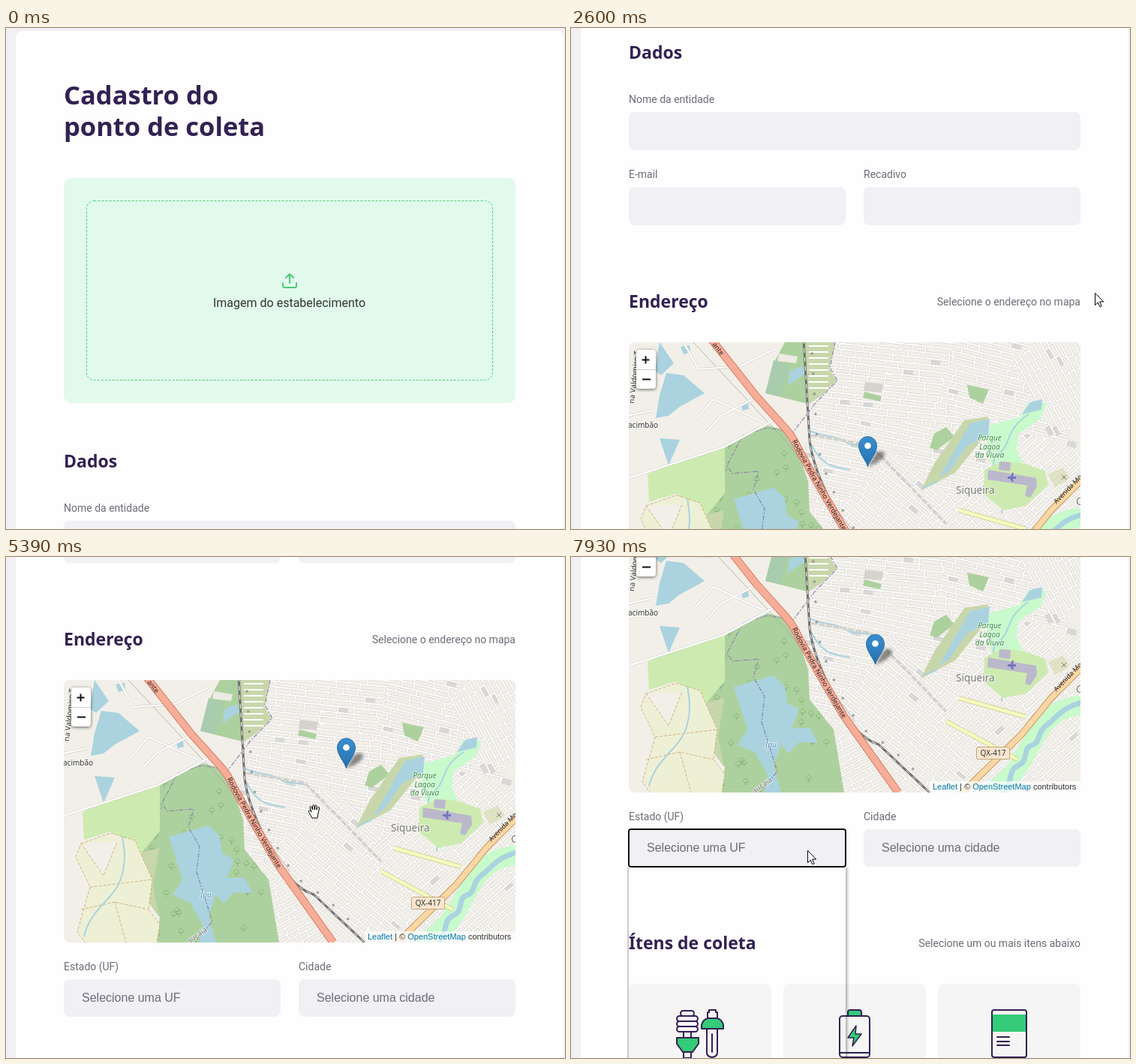
Animation of 745 by 668 pixels, one loop 8 s. Source, as an HTML page:

```html
<!DOCTYPE html>
<html lang="pt-BR">
<head>
<meta charset="utf-8">
<title>Cadastro do ponto de coleta</title>
<style>
html, body { margin: 0; width: 100%; height: 100%; overflow: hidden; background: #f0f0f5; }
svg { display: block; }
text { font-family: Roboto, sans-serif; font-size: 14px; fill: #6c6c78; }
.h1, .h2 { font: bold 34.5px "Noto Sans", sans-serif; fill: #322153; }
.h2 { font-size: 23px; }
.end { text-anchor: end; }
.mid, .park { text-anchor: middle; }
.select { font: 16px "Liberation Sans", Arial, sans-serif; fill: #6c6c75; }
.input { fill: #f0f0f5; }
.card { fill: #f5f5f5; }
.place { font: 10px "Noto Sans", sans-serif; fill: #333; stroke: #fff; stroke-width: 2px; stroke-opacity: .6; paint-order: stroke; }
.road { font-size: 9px; fill: #222; stroke: none; }
.town { font-size: 13.5px; fill: #777; }
.park { font-style: italic; fill: #2f8a3c; }
.credit { font: 11px "Liberation Sans", Arial, sans-serif; fill: #333; }
.line { fill: none; stroke-linejoin: round; }
.water { fill: #aad3df; }
.stream { stroke: #aad3df; stroke-width: 2; }
.wood { fill: #add19e; }
.grass { fill: #cdebb0; }
.scrub { fill: #c8d7ab; }
.track { stroke: #c9a468; stroke-width: .8; stroke-dasharray: 4 2; }
.border { stroke: #8f83ae; stroke-width: 1.2; stroke-dasharray: 6 2 2 2; }
.icon { fill: none; stroke: #322153; stroke-width: 2; stroke-linejoin: round; stroke-linecap: round; }
.icon .fill { fill: #34cb79; }
</style>
</head>
<body>
<svg width="745" height="668" viewBox="0 0 745 668">
<defs>
  <clipPath id="frame"><rect x="77" y="164" width="602" height="350" rx="8"/></clipPath>
  <clipPath id="east"><path d="M311 164L318 290 302 330 365 514H679V164Z"/></clipPath>
  <path id="forest" d="M205 303L262 275 288 282 303 310 316 350 318 390 350 430 364 514H200L205 480 182 450 180 395 205 365Z"/>
  <clipPath id="inForest"><use href="#forest"/></clipPath>
  <path id="highway" d="M187 160L247 236 284 277Q296 290 303 306L332 358 363 411 436 514"/>
  <path id="rail" d="M310 160L318 295Q322 330 350 385T410 450L480 516"/>
  <path id="avenue" d="M519 517L600 437 640 388 685 343"/>
  <path id="lanes" d="M500 419L595 470M517 388L606 413"/>
  <path id="roads" d="M77 345L203 304 270 268M77 262L108 255M150 164L170 200 225 196 270 174M165 268L190 240 255 270M180 284L200 262 246 238"/>
  <path id="tree" d="M0 5V0M-2 1C-4 1-4-3-2-3C-1-5 2-5 2-3C4-2 4 1 2 1Z"/>
  <linearGradient id="pinFill" x2="0" y2="1"><stop stop-color="#3b8fce"/><stop offset="1" stop-color="#2470b0"/></linearGradient>
  <linearGradient id="shade"><stop stop-opacity=".28"/><stop offset="1" stop-opacity="0"/></linearGradient>
  <filter id="soft" x="-50%" y="-50%" width="200%" height="200%"><feGaussianBlur stdDeviation="2"/></filter>
</defs>
<rect width="745" height="668" fill="#f0f0f5"/>
<g id="page">
  <rect x="13" y="4" width="730" height="1900" rx="8" fill="#fefefe"/>
  <text class="h1" x="77" y="102">Cadastro do</text>
  <text class="h1" x="77" y="144">ponto de coleta</text>
  <rect x="77" y="200" width="602" height="300" rx="10" fill="#e1faec"/>
  <rect x="107.5" y="230.5" width="541" height="239" rx="10" fill="none" stroke="#4ecb79" stroke-dasharray="3 2"/>
  <path transform="translate(366 325)" d="M21 15v4a2 2 0 0 1-2 2H5a2 2 0 0 1-2-2v-4M17 8L12 3 7 8M12 3V15" fill="none" stroke="#4ecb79" stroke-width="2" stroke-linecap="round" stroke-linejoin="round"/>
  <text class="mid" x="377.5" y="372" style="font-size:16px;fill:#333">Imagem do estabelecimento</text>
  <text class="h2" x="77" y="586">Dados</text>
  <text class="h2" x="77" y="918">Endereço</text>
  <text class="end" x="679" y="915">Selecione o endereço no mapa</text>
  <text class="h2" x="77" y="1523">Ítens de coleta</text>
  <text class="end" x="679" y="1520">Selecione um ou mais itens abaixo</text>
  <g id="form"></g>

  <g transform="translate(0 800)" clip-path="url(#frame)">
    <rect x="77" y="164" width="602" height="350" fill="#f2efe9"/>
    <g id="streets" clip-path="url(#east)"></g>

    <path class="grass" d="M102 340L130 326 205 303 210 330 205 365 180 395 140 366 104 377Z"/>
    <use href="#forest" class="wood"/>
    <g id="trees" class="line" stroke="#86b378" clip-path="url(#inForest)"></g>
    <path class="scrub" d="M181 394L204 388 196 440 204 480 182 450Z"/>
    <path class="line track" d="M100 382L140 368 172 378 195 430 190 470 205 490 200 520H110L95 500 112 440 93 400ZL130 425 148 380M112 440L195 430M100 470L145 460 190 470M145 460L160 514" style="fill:#eef0d5"/>
    <path class="line stream" d="M155 372C158 390 161 408 152 432S112 470 104 506"/>
    <path class="water" d="M217 373L270 358 285 372 288 395 304 403 294 428 318 428 329 448 304 447 290 462 280 450 270 480 280 514H258L262 490 245 460 222 451 235 430Z"/>
    <path class="water" d="M127 205L150 208 178 232 145 250 130 262 113 265 118 235ZM118 164L137 192 120 208 112 202ZM146 170L158 168 159 177 150 180ZM227 248L236 245 237 253 229 255ZM118 292L145 294 130 328Z"/>
    <path class="line stream" d="M318 282C340 292 350 286 372 300L398 303M320 300C335 330 350 330 372 334"/>
    <path class="wood" d="M285 164H314L315 246 259 232 270 192Z"/>
    <path d="M270 188L291 194 279 236 259 232Z" fill="#a9cbae"/>
    <path d="M277 179L302 183 300 192 275 189Z" fill="#eceae4"/>
    <path class="water" d="M292 202L308 196 312 206 288 222Z"/>
    <path class="scrub" d="M313 164H352L344 200 354 215 335 234 316 247Z"/>
    <path d="M330 168V232" stroke="#fff" stroke-width="26" stroke-dasharray="2 6"/>

    <path d="M392 217L416 220 414 231 390 229Z" fill="#d6d3cd"/>
    <path class="wood" d="M391 230L414 236 412 243 389 238ZM528 221L557 227 549 246 531 238ZM484 286L500 277 511 290 487 308 478 304Z"/>
    <path class="scrub" d="M524 268L556 263 552 288 512 338 466 362 484 326Z"/>
    <path d="M558 275L598 264 610 244 634 245 626 266 596 286 594 308 604 328 560 326 552 305Z" fill="#c8facc"/>
    <path class="water" d="M532 272L558 266 556 288 528 302 504 336 490 346 518 296ZM601 260L612 244 628 240 627 254Z"/>
    <path class="line stream" d="M610 260C578 280 588 300 569 314S584 350 574 392M488 350L470 358"/>
    <path class="grass" d="M551 334L575 322 606 326 632 336 636 354 606 382 576 388 550 366Z"/>
    <path d="M556 334L620 345 621 357 612 371 605 369 608 355 555 347ZM571 323L586 324 585 336 570 334Z" fill="#bbb8cc"/>
    <path d="M582 343H586L588 338H590L589 343H593V346H589L590 350H588L585 346H582Z" fill="#7478bd"/>
    <path d="M636 340L655 331 665 345 645 358Z" fill="#dfe3c4"/>
    <path class="line" d="M654 341l6 6m0-6l-6 6" stroke="#777"/>
    <path class="line" d="M690 398C640 396 627 426 610 455S595 488 553 519" stroke="#c8facc" stroke-width="26"/>
    <path class="line" d="M690 392C656 397 648 414 634 424S627 447 614 451 611 472 596 478 590 502 574 520" stroke="#aad3df" stroke-width="7"/>

    <path class="line" d="M163 164L290 300 379 420" stroke="#aaa8a5" stroke-width=".8"/>
    <path class="line" d="M320 288L398 301 446 350 500 406" stroke="#d3d1ce" stroke-width="3.500" stroke-dasharray="8 2"/>
    <path class="line border" d="M352 164L345 198 355 215 325 246 296 284 262 278 229 288 208 328 215 339 250 336 243 360 258 386 254 420 275 486 250 516"/>
    <g id="routes" class="line"></g>

    <text class="place road" dy="3"><textPath href="#highway" startOffset="174">Rodovia Pedra Ninho Verdejante</textPath></text>
    <text class="place road" transform="translate(188 167) rotate(52)">ante</text>
    <text class="place road" transform="translate(647 380) rotate(-46)">Avenida Montes</text>
    <text class="place" transform="translate(84 246) rotate(-84)">na Valdomiro T</text>
    <text class="place" x="76" y="278">acimbão</text>
    <text class="place" transform="translate(244 516) rotate(-35)" style="fill:#777">aucaia</text>
    <text class="place" x="259" y="454" style="font-style:italic;fill:#5b8fbc">Ipu</text>
    <text class="place park" x="558" y="295">Parque</text>
    <text class="place park" x="558" y="307">Lagoa</text>
    <text class="place park" x="558" y="318">da Viuva</text>
    <text class="place town" x="513" y="366">Siqueira</text>
    <text class="place town" x="673" y="381">C</text>
    <rect x="540.5" y="453.5" width="44" height="16" rx="2" fill="#fae6cf" stroke="#c6a57c"/>
    <text class="place mid" x="562.5" y="465" style="stroke:none">QX-417</text>

    <g id="pin">
      <path d="M0 0L10-17C14-22 25-22 22-15C19-8 6-2 0 0Z" opacity=".45" filter="url(#soft)"/>
      <path d="M0-.5C-2-8-12-18-12-28A12 12.3 0 0 1 12-28C12-18 2-8 0-.5Z" fill="url(#pinFill)" stroke="#2b6ea5"/>
      <circle cy="-28" r="4.300" fill="#fff"/>
    </g>
    <rect x="87" y="175" width="26" height="52" rx="4" opacity=".6" filter="url(#soft)"/>
    <rect x="87" y="174" width="26" height="52" rx="4" fill="#fff"/>
    <path d="M87 200.500H113" stroke="#ccc"/>
    <path d="M94.500 187.500H104.500M99.500 182.500V192.500M95 213.500H106" stroke="#111" stroke-width="2"/>
    <rect x="478" y="499" width="201" height="15" fill="#fff" opacity=".7"/>
    <text class="credit" x="482" y="510"><tspan fill="#0078a8">Leaflet</tspan> | © <tspan fill="#0078a8">OpenStreetMap</tspan> contributors</text>
  </g>

  <g class="icon" transform="translate(0 1000)">
    <rect x="146" y="605" width="18" height="7" rx="3.500"/>
    <g id="coils"></g>
    <path d="M150 633V641M160 633V641M150 660V668H160V660"/>
    <path class="fill" d="M141 641H170V649L162 660H149L141 649Z"/>
    <path d="M182 615V607H184V604H193V607H195V615M181 629V661Q181 666 188 667Q195 666 195 661V629M188 636V660"/>
    <path class="fill" d="M174 629V624Q176 616 183 615H194Q201 616 203 624V629Z"/>
    <path class="fill" d="M369 612V607Q369 604 372 604H384Q387 604 387 607V612Z"/>
    <rect x="358" y="612" width="40" height="55" rx="4"/>
    <path d="M358 661H398"/>
    <path class="fill" stroke-width="1.500" d="M380 625L369 641H377L375 652 387 636H379Z"/>
    <rect class="fill" x="561" y="610" width="46" height="23" stroke="none"/>
    <rect x="561" y="604" width="46" height="63" rx="3"/>
    <path d="M568 640H584M568 646H584M568 651H584"/>
  </g>
  <g id="popup">
    <rect x="366" y="1414" width="5" height="300" fill="url(#shade)"/>
    <rect x="-77" y="1414" width="3" height="300" fill="url(#shade)" transform="scale(-1 1)"/>
    <rect x="77" y="1363" width="289" height="50" rx="3" fill="none" stroke="#101010" stroke-width="2"/>
  </g>
</g>
<g id="cursor" fill="#fff" stroke="#000" stroke-linejoin="round">
  <path id="arrow" d="M.5.5V16.500L4.300 13 6.800 18.700 9.200 17.700 6.700 12H11.700Z"/>
  <path id="hand" d="M-3 9L-7 2C-9-1-6-2-5 0L-4 1-6-5C-6-7-4-7-3.500-5L-2.500-2V-7C-2.500-9-.3-9-.2-7L0-2 1-7C1.300-8.500 3.200-8.300 3-6.500L2.700-2 4.500-5C5.300-6.500 7-5.500 6.600-4L5 3 4 9Z"/>
</g>
</svg>
<script>
const $ = id => document.getElementById(id);
const repeat = (n, f) => Array.from({ length: n }, (_, i) => f(i)).join('');
let seed = 7;
const rnd = () => (seed = seed * 16807 % 2147483647) / 2147483647;

const field = (label, x, y, width, hint = '') =>
  `<text x="${x}" y="${y - 12}">${label}</text>
   <rect class="input" x="${x}" y="${y}" width="${width}" height="${hint ? 50 : 51}" rx="8"/>
   <text class="select" x="${x + 24}" y="${y + 30}">${hint}</text>`;
$('form').innerHTML =
  field('Nome da entidade', 77, 657, 602) +
  field('E-mail', 77, 757, 289) + field('Recadivo', 390, 757, 289) +
  field('Estado (UF)', 77, 1363, 289, 'Selecione uma UF') + field('Cidade', 390, 1363, 289, 'Selecione uma cidade') +
  repeat(3, i => `<rect class="card" x="${77 + 206 * i}" y="1569" width="190" height="180" rx="8"/>`);
$('coils').innerHTML = repeat(3, i => `<rect x="141" y="${612 + 7 * i}" width="28" height="7" rx="3.5"/>`);

// A turned rectangle of irregular street blocks, with a few built-up ones.
function district(angle, x, y, w, h) {
  let d = '', built = '';
  for (let v = -h / 2; v < h / 2; v += 7 + 2 * rnd()) {
    d += `M${-w / 2} ${v}h${w}`;
    for (let u = -w / 2 + 20 * rnd(); u < w / 2; u += 14 + 20 * rnd()) {
      d += `M${u} ${v}v8`;
      if (rnd() < .04) built += `M${u} ${v}h14v8h-14z`;
    }
  }
  return `<g class="line" transform="translate(${x} ${y}) rotate(${angle})">
    <rect x="${-w / 2}" y="${-h / 2}" width="${w}" height="${h}" fill="#f2efe9"/>
    <path d="${built}" fill="#d9d8d6"/>
    <path d="${d}" stroke="#d0cdc8" stroke-width="3"/><path d="${d}" stroke="#fff" stroke-width="1.9"/></g>`;
}
$('streets').innerHTML =
  district(-28, 370, 440, 200, 200) + district(12, 430, 300, 320, 260) +
  district(6, 440, 210, 260, 120) + district(40, 490, 450, 280, 140) +
  district(-42, 620, 400, 220, 190) + district(14, 590, 215, 180, 130) + district(62, 655, 215, 120, 90);

$('trees').innerHTML = repeat(40, () => `<use href="#tree" x="${190 + 160 * rnd()}" y="${285 + 225 * rnd()}"/>`);

const route = (name, casing, outer, fill, inner, dash = 'none') =>
  `<use href="#${name}" stroke="${casing}" stroke-width="${outer}"/>
   <use href="#${name}" stroke="${fill}" stroke-width="${inner}" stroke-dasharray="${dash}"/>`;
const rail = $('rail');
$('routes').innerHTML =
  route('roads', '#d0cdc8', 3.4, '#fff', 2.2) + route('lanes', '#c8c98e', 6, '#f7fabf', 4.6) +
  route('avenue', '#b98a4e', 9, '#fcd6a4', 7.4) + route('rail', '#707070', 3, '#fff', 1, '6 6') +
  route('highway', '#d8745c', 10.5, '#f6ae99', 8.6) +
  repeat(14, i => {
    const p = rail.getPointAtLength(20 + 27 * i);
    return `<rect x="${p.x + 9}" y="${p.y - 2}" width="2" height="2" fill="#fff" stroke="#666" stroke-width=".8"/>`;
  });

// Progress from 0 to 1 in n held steps; the first falls on t0, the last on t1.
const steps = (t, t0, t1, n) =>
  t < t0 ? 0 : Math.min(1, (Math.floor((t - t0) * (n - 1) / (t1 - t0) + .08) + 1) / n);

// start, end, steps, distance
const scrolls = [[1210, 1830, 9, 300], [2220, 2740, 8, 300], [3280, 3450, 3, 100], [3830, 3990, 3, 100], [6770, 7090, 5, 200]];
const scrollEase = p => p * (.3 + .7 * p * (3 - 2 * p));

// start, end, steps, destination, sideways bend
const moves = [
  [120, 740, 9, 698, 353, -.22],
  [4150, 4700, 8, 454, 282, .2],
  [5150, 5540, 6, 405, 343, -.18],
  [6000, 6540, 8, 707, 337, .03],
  [7320, 7850, 8, 315, 391, -.02]
];

function cursorAt(t) {
  let x = 729, y = 638;
  for (const [t0, t1, n, toX, toY, bend] of moves) {
    const u = 1 - (1 - steps(t, t0, t1, n)) ** 2.2;
    const dx = toX - x, dy = toY - y, side = 2 * u * (1 - u) * bend;
    x += dx * u - dy * side;
    y += dy * u + dx * side;
    if (u < 1) break;
  }
  return [Math.round(x), Math.round(y)];
}

const place = (id, x, y) => $(id).setAttribute('transform', `translate(${x} ${y})`);
const show = (id, on) => $(id).style.display = on ? '' : 'none';

function draw() {
  const t = performance.now() % 8000;
  const scroll = scrolls.reduce((sum, [t0, t1, n, by]) => sum + by * scrollEase(steps(t, t0, t1, n)), 0);
  place('page', 0, -Math.round(scroll));
  place('pin', ...(t < 4850 ? [395.5, 330] : t < 5690 ? [453.5, 282] : [405.5, 343.5]));

  const [x, y] = cursorAt(t);
  const overMap = t >= 4150 && t < 6700 && x < 679;
  place('cursor', x, y);
  show('cursor', t >= 120);
  show('hand', overMap);
  show('arrow', !overMap);
  show('popup', t >= 7930);
  requestAnimationFrame(draw);
}
draw();
</script>
</body>
</html>
```
